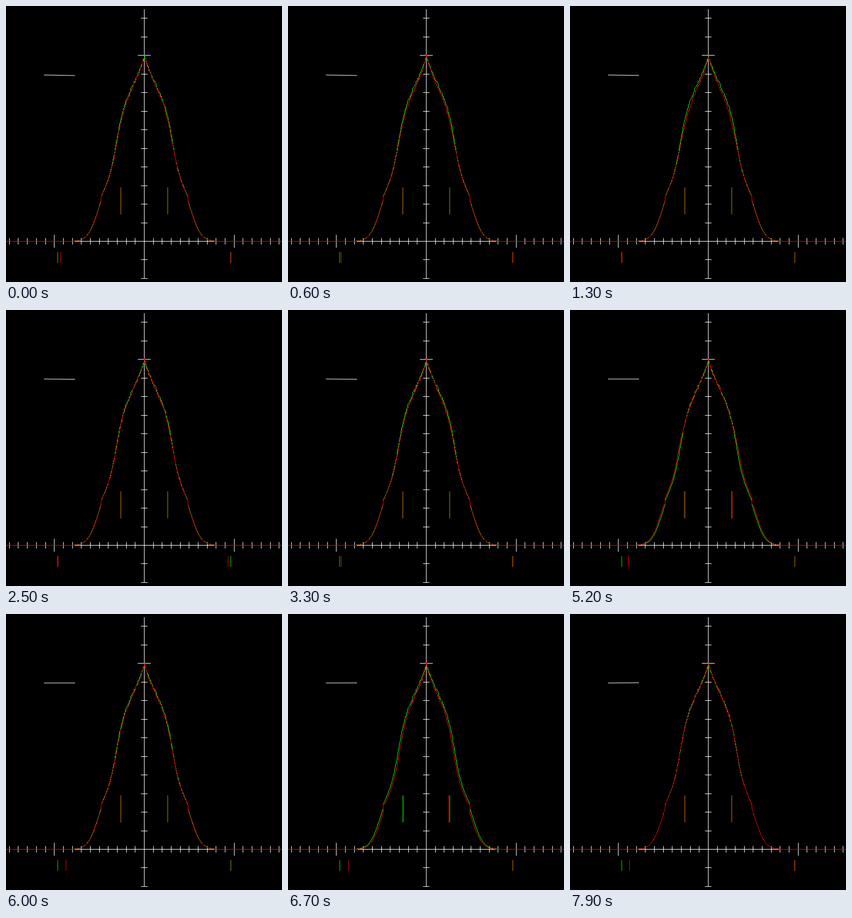
Recreate the animation shown at these times as an HTML page with a canvas. Size 512 by 512 pixels, loop 8 s.

```html
<!DOCTYPE html>
<html>
<head>
<meta charset="utf-8">
<style>
html, body { margin: 0; width: 100%; height: 100%; overflow: hidden; background: #000; }
canvas { display: block; width: 512px; height: 512px; }
</style>
</head>
<body>
<canvas id="stage" width="512" height="512"></canvas>
<script>
const ctx = document.getElementById('stage').getContext('2d');
const SIZE = 512, MID = 256, BASE = 436, LOOP = 8000, STEP = 100;
const GREEN = '#00ee00', RED = '#f00000', WHITE = '#fff';

const clamp = (v, a, b) => Math.max(a, Math.min(b, v));
const mix = (a, b, k) => a + (b - a) * k;

function random(seed) {
  return () => {
    seed = (seed * 1664525 + 1013904223) >>> 0;
    return seed / 4294967296;
  };
}

function line(x1, y1, x2, y2, color) {
  ctx.strokeStyle = color;
  ctx.beginPath();
  ctx.moveTo(x1, y1);
  ctx.lineTo(x2, y2);
  ctx.stroke();
}

function axes() {
  const cx = MID + 0.5, cy = BASE + 0.5;
  line(cx, 6, cx, 506, WHITE);
  line(0, cy, SIZE, cy, WHITE);
  for (let k = -15; k <= 15; k++) {
    if (!k) continue;
    const x = Math.round(MID + k * 16.68) + 0.5, r = k % 10 ? 6 : 12;
    line(x, cy - r, x, cy + r, WHITE);
  }
  for (let k = -2; k <= 12; k++) {
    if (!k) continue;
    const y = cy - Math.trunc(k * 34.5), r = k === 10 ? 12 : 6;
    line(cx - r, y, cx + r, y, WHITE);
  }
}

// Height at distance d: a cusp, a slope with a smooth drop, then a gaussian tail past a small step.
function height(d) {
  if (d > 80) return 103 * Math.exp(-((d - 65) ** 2) / 770);
  return 336 - 2.15 * d - 81 / (1 + Math.exp((52 - d) / 5.5)) + 7 * Math.exp(-d / 4);
}

function curve(color, upper, lower, seed, rough) {
  const rnd = random(seed);
  let last = BASE;
  ctx.fillStyle = color;
  for (let x = 0; x < SIZE; x++) {
    const d = Math.abs(x - MID);
    const shift = mix(upper, lower, clamp((d - 40) / 15, 0, 1)) * clamp(d / 12, 0, 1);
    const at = d <= 80 ? clamp(d + shift, 0, 80) : Math.max(d + shift, 80.5);
    const noise = (rnd() - 0.5) * rough * clamp((84 - d) / 50, 0, 1);
    const y = Math.round(BASE - height(at) + noise);
    ctx.fillRect(x, Math.min(y, last), 1, Math.max(1, Math.abs(y - last)));
    last = y;
  }
}

function mark(x, y, h, color) {
  line(x, y, x, y + h, color);
}

function draw(ms) {
  const t = ms / 1000;
  const upper = 2.3 - 0.12 * t + 1.1 * Math.cos((t - 1.3) * 2.285);
  const lower = 0.4 - 2.4 * Math.sin((t - 4.2) * 1.75) * clamp(t - 3.8, 0, 1);
  const leftX = 104.2 - 8.2 * Math.cos((t - 1.9) * 0.64);
  const rightX = 417 + 0.6 * Math.cos((t - 5.9) * 1.65) - 5.5 * Math.exp(-(((t - 2.5) / 0.5) ** 2));

  ctx.fillStyle = '#000';
  ctx.fillRect(0, 0, SIZE, SIZE);
  axes();
  line(70.5, 128, 128, mix(129, 127.6, ms / LOOP), WHITE);

  curve(GREEN, 0, 0, 77, 5);
  curve(RED, upper, lower, 1000 + ms * 31, 6);

  // Fractional positions blend the marks through antialiasing.
  for (const [x, side] of [[213, 1], [300, -1]]) {
    mark(x, 336.5, 50, GREEN);
    mark(x + side * lower / 2, 336.5, 50, RED);
  }
  for (const [x, moving] of [[96, leftX], [417, rightX]]) {
    mark(x, 456.5, 20, GREEN);
    mark(moving, 456.5, 20, RED);
  }
}

const start = performance.now();
function frame() {
  const ms = (performance.now() - start) % LOOP;
  draw(Math.floor(ms / STEP) * STEP);
  requestAnimationFrame(frame);
}
frame();
</script>
</body>
</html>
```
